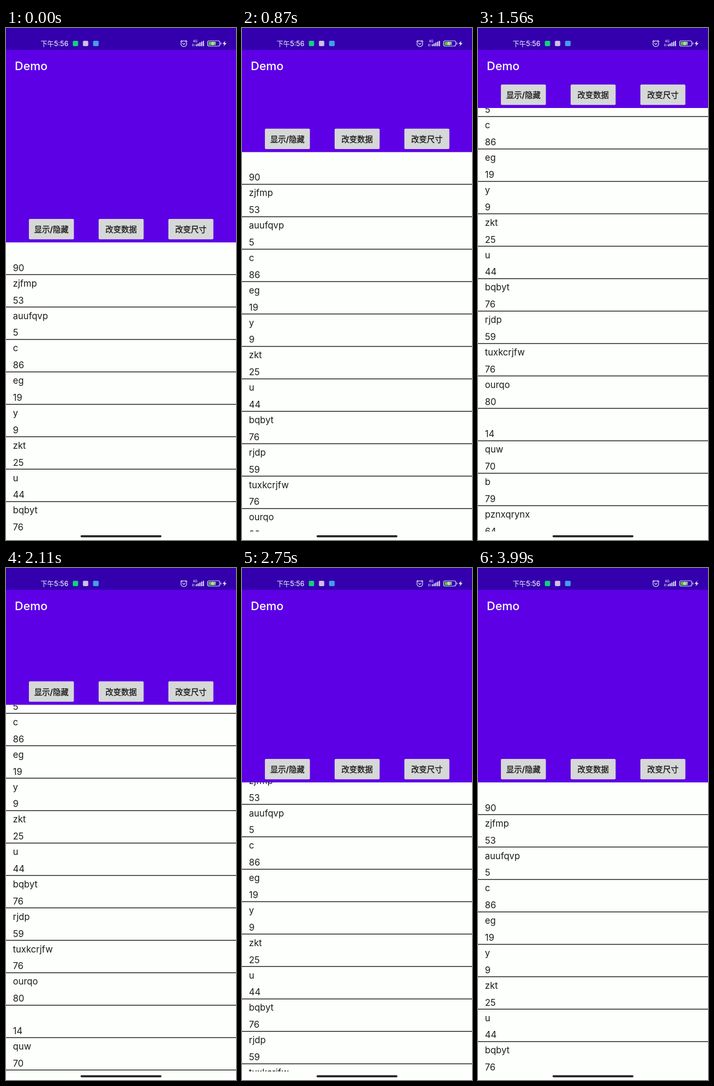
These frames come from a looping animation (432x960 px, 4040 ms). An HTML page:

```html
<!DOCTYPE html>
<html lang="zh">
<head>
<meta charset="utf-8">
<style>
  html, body { margin: 0; width: 100%; height: 100%; overflow: hidden; background: #fdfffc; }
  svg { display: block; width: 432px; height: 960px; }
  text { font-family: Inter, "Noto Sans CJK SC", "Noto Sans CJK", sans-serif; }
  #list text { font-size: 17px; fill: #1c1c1c; }
  #buttons text { font-size: 14.8px; font-weight: 500; fill: #161616; stroke: #161616; stroke-width: .3; text-anchor: middle; }
  .line { fill: none; stroke: #e9e2fa; stroke-linecap: round; }
</style>
</head>
<body>
<svg viewBox="0 0 432 960">
  <g id="list"></g>
  <rect y="944" width="432" height="16" fill="#fdfffc"/>
  <rect x="140" y="951" width="152" height="4" rx="2" fill="#2b2b2b"/>

  <g id="header">
    <rect width="432" height="402" fill="#5d00e6"/>
    <g id="buttons"></g>
  </g>

  <!-- toolbar -->
  <rect y="41" width="432" height="60" fill="#5d00e6"/>
  <rect y="101" width="432" height="1" fill="#000" opacity=".06"/>
  <text x="16.5" y="79" font-size="22" font-weight="500" fill="#fff">Demo</text>

  <!-- status bar -->
  <rect width="432" height="41" fill="#3400ae"/>
  <text x="65" y="33.5" font-size="12.6" font-weight="500" fill="#f3effc">下午5:56</text>
  <rect x="125.5" y="24" width="10" height="10" rx="2" fill="#12d27a"/>
  <rect x="144.5" y="24" width="10" height="10" rx="2" fill="#d0bfe6"/>
  <rect x="163.5" y="24" width="10.5" height="10" rx="2" fill="#429fe8"/>
  <g class="line" stroke-width="1.2">
    <circle cx="334" cy="29.5" r="5.4"/>
    <path d="M328 25.5l2.6-2.3M340 25.5l-2.6-2.3M331.6 28.8l2.4 2 2.4-2"/>
    <rect x="378.6" y="24" width="23" height="10" rx="3"/>
    <path d="M403.8 27.7v2.6"/>
  </g>
  <rect x="380.5" y="25.8" width="12" height="6.4" rx="1.5" fill="#5fc23c"/>
  <text x="390" y="31.9" font-size="8" font-weight="600" fill="#fff" text-anchor="middle">61</text>
  <text x="351" y="26.5" font-size="6.2" font-weight="500" fill="#e9e2fa">4G</text>
  <path class="line" stroke-width=".9" d="M350.5 30v4M353 30v4"/>
  <g id="signal" fill="#e9e2fa"></g>
  <path d="M412 24l-5.2 5.8h3.3l-1.4 4.4 5.5-6h-3.4z" fill="#f3effc"/>
</svg>
<script>
const $ = id => document.getElementById(id);
const rows = ` 90,zjfmp 53,auufqvp 5,c 86,eg 19,y 9,zkt 25,u 44,bqbyt 76,rjdp 59,tuxkcrjfw 76,ourqo 80, 14,quw 70,b 79,pznxqrynx 64`
  .split(',').map(row => row.split(' '));
const PITCH = 60.8, FULL = 402, COLLAPSE = 252, MAX_SCROLL = 166;
const STEP = 550 / 12, LOOP = 4040;

$('list').innerHTML = rows.map(([name, number], i) => {
  const top = FULL + i * PITCH, bottom = top + PITCH;
  return `<text x="13" y="${top + 22}">${name}</text>
    <text x="13" y="${bottom - 7}">${number}</text>
    <rect y="${bottom - 1.1}" width="432" height="1.4" fill="#111"/>`;
}).join('');

$('buttons').innerHTML = ['显示/隐藏', '改变数据', '改变尺寸'].map((label, i) => {
  const x = 43 + i * 131;
  return `<rect x="${x}" y="358" width="84.5" height="38.3" rx="2" fill="#d6d7d7"/>
    <text x="${x + 42.3}" y="383">${label}</text>`;
}).join('');

$('signal').innerHTML = [0, 1, 2, 3, 4].map(i =>
  `<rect x="${356.5 + i * 3.3}" y="${30.5 - i * 1.65}" width="2.1" height="${3.7 + i * 1.65}" rx=".8"/>`).join('');

// Drag distance: time, distance, speed
const keys = [
  [250, 0, 0], [600, 46, .35], [1190, 326.2, .4], [1560, 418, 0], [1680, 418, 0],
  [2110, 311.5, -.35], [2200, 280, -.36], [2750, 80, -.32], [3150, 0, 0]
];

function dragAt(t) {
  const i = keys.findIndex(key => key[0] > t);
  if (i < 1) return 0;
  const [t0, p0, v0] = keys[i - 1], [t1, p1, v1] = keys[i];
  const d = t1 - t0, u = (t - t0) / d, w = 1 - u;
  return w * w * ((1 + 2 * u) * p0 + u * d * v0) + u * u * ((3 - 2 * u) * p1 - w * d * v1);
}

function draw(now) {
  // The screen refreshes in even steps, timed to 10 ms.
  const step = Math.floor((now % LOOP + 2) / STEP);
  const t = Math.round(step * STEP / 10) * 10;
  const drag = dragAt(t);
  // Going up the header folds first; coming down it unfolds first.
  const folded = t < 1620 ? Math.min(drag, COLLAPSE) : Math.max(0, drag - MAX_SCROLL);
  $('header').setAttribute('transform', `translate(0 ${-folded})`);
  $('list').setAttribute('transform', `translate(0 ${-drag})`);
}

const start = performance.now();
function tick() {
  draw(performance.now() - start);
  requestAnimationFrame(tick);
}
tick();
</script>
</body>
</html>
```
